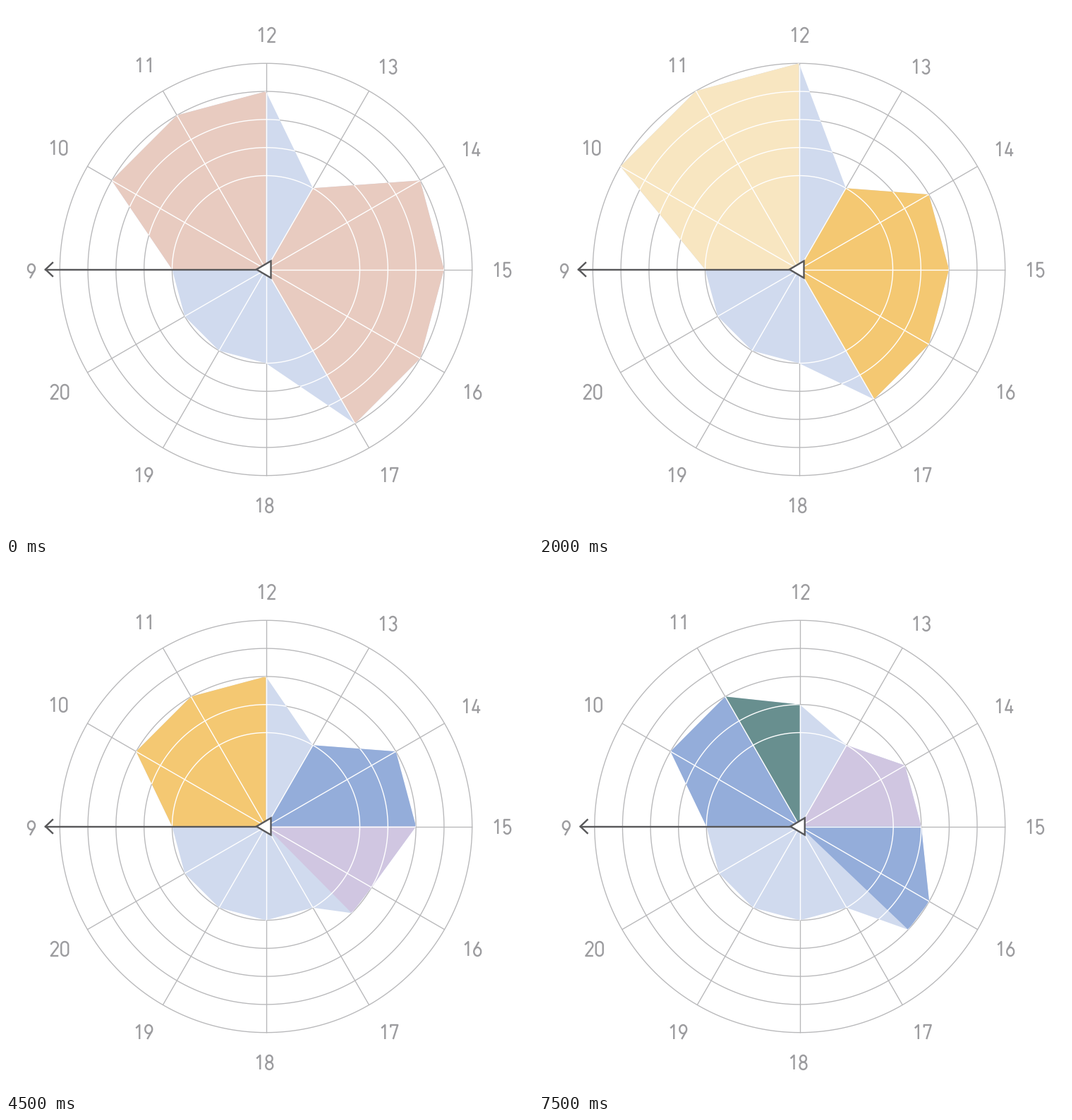
Animation of 747 by 750 pixels, one loop 8000 ms. Source, as a matplotlib script:

```python
import numpy as np
import matplotlib.pyplot as plt
from matplotlib.animation import FuncAnimation
from matplotlib.collections import LineCollection
from matplotlib.patches import Polygon

W, H, DPI = 747, 750, 100
CX, CY = 368.5, 373.5
R0, STEP = 133, 39.8
RIGHT, SQUEEZE = 661, 582.5 / 585
HOURS = range(9, 21)

GRID, LABEL, DARK = "#b8b8ba", "#9c9c9f", "#58585a"
PALE, BLUE, GREEN = "#d0daee", "#94adda", "#688f8f"
SALMON, PURPLE = "#e8cbc0", "#d0c6e1"
YELLOW, CREAM = "#f4c872", "#f8e6c1"


def pt(lw):
    return lw * 72 / DPI


def polar(hour, r):
    a = np.radians((hour - 15) * 30)
    return CX + r * np.cos(a), CY + r * np.sin(a)


# Digits as strokes in a 10 x 20 box, y up
def arc(cx, cy, rx, ry, start, end):
    a = np.radians(np.linspace(start, end, 40))
    return [(cx + rx * np.cos(t), cy + ry * np.sin(t)) for t in a]


SIX = [arc(5, 6, 5, 6, 0, 360), [(7, 20), (0.7, 9)]]
GLYPHS = {
    "0": [arc(5, 15, 5, 5, 0, 180) + arc(5, 5, 5, 5, 180, 360) + [(10, 15)]],
    "1": [[(1.5, 15.5), (6.5, 20), (6.5, 0)]],
    "2": [arc(5, 15, 5, 5, 170, -35) + [(0, 0), (10.5, 0)]],
    "3": [arc(5, 15.2, 4.7, 4.8, 160, -90), arc(5, 5.2, 5, 5.2, 90, -160)],
    "4": [[(6, 20), (0, 4.5), (11, 4.5)], [(8, 11), (8, 0)]],
    "5": [[(9.5, 20), (1, 20), (0.7, 9.5)] + arc(5, 6.2, 5, 6.2, 145, -155)],
    "6": SIX,
    "7": [[(0, 16.5), (0, 20), (10, 20), (3.5, 0)]],
    "8": [arc(5, 15.2, 4.4, 4.8, 0, 360), arc(5, 5.2, 5, 5.2, 0, 360)],
    "9": [[(10 - x, 20 - y) for x, y in s] for s in SIX],
}
ADVANCE = 14.5

LABELS = {
    9: (36, 376), 10: (74, 201), 11: (196, 84), 12: (369, 41),
    13: (541, 86), 14: (659, 203), 15: (703, 374), 16: (661, 547),
    17: (543, 665), 18: (366, 708), 19: (195, 665), 20: (76, 547),
}


def label_strokes(text, x, y):
    left = x - (10 + ADVANCE * (len(text) - 1)) / 2
    for i, ch in enumerate(text):
        for stroke in GLYPHS[ch]:
            yield [(left + i * ADVANCE + u, y + 10 - v) for u, v in stroke]


def grid_lines():
    t = np.linspace(0, 2 * np.pi, 241)
    lines = []
    for k in range(5):
        r = R0 + k * STEP
        lines.append(np.column_stack([CX + r * np.cos(t), CY + r * np.sin(t)]))
    rim = R0 + 4 * STEP
    lines += [[(CX, CY), polar(h, rim)] for h in HOURS]
    return lines


def state(left, right, *spans, tail=None, squeeze=False):
    """left: rings at 10-12; right: rings from 14 on; tail: extra vertex."""
    rings = {h: 0 for h in range(9, 22)}
    rings.update({10 + i: int(c) for i, c in enumerate(left)})
    rings.update({14 + i: int(c) for i, c in enumerate(right)})
    if tail:
        rings[tail[0]] = tail[1]
    return sorted(rings.items()), spans, squeeze


STATES = [
    state("333", "3333", (9, 12, SALMON), (13, 17, SALMON)),
    state("222", "111", (9, 12, BLUE), (13, 16.5, PURPLE), tail=(16.5, 1)),
    state("333", "2222", (9, 12, PURPLE), (13, 17, BLUE)),
    state("222", "331", (9, 12, BLUE), (13, 15, YELLOW), (15, 16.49, GREEN),
          tail=(16.49, 1)),
    state("444", "2222", (9, 12, CREAM), (13, 17, YELLOW)),
    state("333", "221", (9, 12, SALMON), (13, 15, BLUE), (15, 16.5, PURPLE),
          tail=(16.5, 1)),
    state("221", "333", (9, 11, BLUE), (11, 12, GREEN), (13, 16.49, PURPLE),
          tail=(16.49, 3)),
    state("421", "44444", (9, 11, CREAM), (11, 12, GREEN), (13, 18, CREAM)),
    state("321", "2444", (9, 11, PURPLE), (11, 12, GREEN), (13, 17, CREAM)),
    state("222", "221", (9, 12, YELLOW), (13, 15, BLUE), (15, 16.51, PURPLE),
          tail=(16.51, 1)),
    state("332", "441", (9, 12, SALMON), (13, 15, CREAM), (15, 16.7, GREEN),
          tail=(16.7, 1)),
    state("221", "333", (9, 11, BLUE), (11, 12, GREEN), (13, 16.49, SALMON),
          tail=(16.49, 3)),
    state("333", "222", (9, 12, PURPLE), (13, 16.5, BLUE), tail=(16.5, 2),
          squeeze=True),
    state("444", "12", (9, 12, CREAM), (13, 14, GREEN), (14, 15, PURPLE)),
    state("222", "1133", (9, 12, BLUE), (13, 15, PURPLE), (15, 17, SALMON),
          squeeze=True),
    state("221", "112", (9, 11, BLUE), (11, 12, GREEN), (13, 15, PURPLE),
          (15, 16.45, BLUE), tail=(16.45, 2), squeeze=True),
]

fig = plt.figure(figsize=(W / DPI, H / DPI), dpi=DPI, facecolor="white")
ax = fig.add_axes([0, 0, 1, 1])
ax.axis("off")
ax.set_ylim(H, 0)

lines = grid_lines()
ax.add_collection(LineCollection(lines, colors=GRID, linewidths=pt(1.35), zorder=1))
white = LineCollection(lines, colors="white", linewidths=pt(1.4), zorder=4)
ax.add_collection(white)

digits = [s for h, p in LABELS.items() for s in label_strokes(str(h), *p)]
ax.add_collection(LineCollection(digits, colors=LABEL, linewidths=pt(2.4), zorder=5))

arrow = dict(color=DARK, lw=pt(2.4), zorder=6, solid_joinstyle="miter")
ax.plot([56, 356], [CY, CY], **arrow)
ax.plot([66, 56, 66], [CY - 9.5, CY, CY + 9.5], **arrow)
ax.add_patch(Polygon([(355, CY), (375.5, CY - 12), (375.5, CY + 12)], fc="white",
                     ec=DARK, lw=pt(2.4), joinstyle="miter", zorder=7))

areas = []


def add_area(points, color, z):
    area = Polygon(points, fc=color, ec="none", lw=0, zorder=z)
    ax.add_patch(area)
    areas.append(area)
    return area


def draw(i):
    points, spans, squeeze = STATES[i]
    k = SQUEEZE if squeeze else 1
    ax.set_xlim(RIGHT - RIGHT / k, RIGHT + (W - RIGHT) / k)
    while areas:
        areas.pop().remove()
    outline = [polar(h, R0 + r * STEP) for h, r in points]
    base = add_area(outline, PALE, 2)
    for a, b, color in spans:
        rim = [p for p, (h, _) in zip(outline, points) if a <= h <= b]
        add_area([(CX, CY)] + rim, color, 3)
    white.set_clip_path(base)
    return areas


anim = FuncAnimation(fig, draw, frames=len(STATES), init_func=lambda: [],
                     interval=500, repeat=True, repeat_delay=0, blit=False)
plt.show()
```
